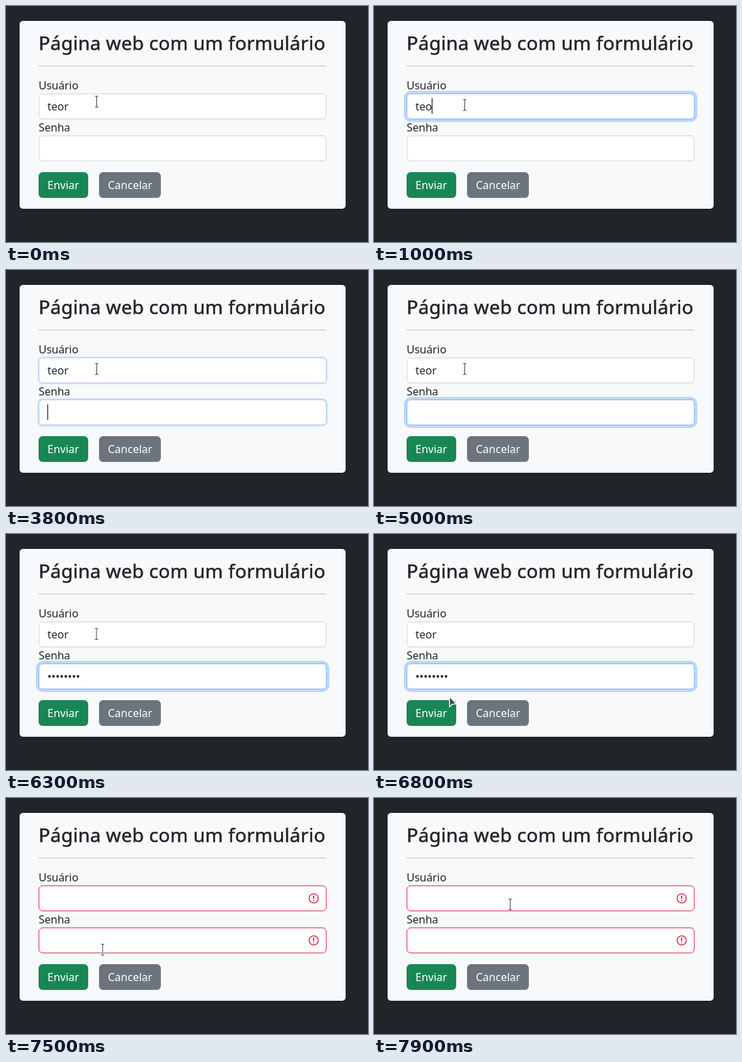
Write an HTML page that moves like this. It is 533 by 348 pixels and loops after 8 s.

```html
<!DOCTYPE html>
<html lang="pt">
<head>
<meta charset="utf-8">
<style>
  html, body { margin: 0; width: 100%; height: 100%; overflow: hidden; background: #212529; }
  svg { display: block; width: 533px; height: 348px; }
  text { font: 16px "Noto Sans", sans-serif; fill: #212529; }
  /* a thin outline and looser spacing give a medium weight */
  .title { font-size: 28px; letter-spacing: .01em; stroke: #212529; stroke-width: .5px; }
  .button { fill: #fff; }
  .ring { fill: none; stroke: #0d6efd; }
</style>
</head>
<body>
<svg viewBox="0 0 533 348">
  <defs><path id="bar" d="M-2.5-8H2.5M0-8V8M-2.5 8H2.5"/></defs>
  <rect x="20" y="22" width="480" height="277" rx="5" fill="#f8f9fa"/>
  <text class="title" x="48" y="65">Página web com um formulário</text>
  <rect x="48" y="88" width="424" height="1" fill="#c2c4c6"/>
  <g id="fields"></g>
  <text x="48" y="123">Usuário</text>
  <text x="48" y="185">Senha</text>
  <rect id="send" x="48" y="245" width="73" height="38" rx="6"/>
  <text class="button" x="61" y="270">Enviar</text>
  <rect x="137" y="245" width="91" height="38" rx="6" fill="#6c757d"/>
  <text class="button" x="150" y="270">Cancelar</text>
  <g id="pointer" stroke-linejoin="round">
    <g id="beam">
      <use href="#bar" stroke="#fff" stroke-width="2.4"/>
      <use href="#bar" stroke="#444"/>
    </g>
    <path id="hand" d="M-1.8 10V1.7a1.8 1.8 0 0 1 3.6 0V7l8.4 1.8q2.6.7 2.4 3.2l-1.4 8H1.5l-7.5-8q-.6-2.4 1.8-2.4z"
      fill="#444" stroke="#fff" stroke-width="1.4"/>
    <path id="arrow" d="M0 0V16l4-4 5.5-.3z" fill="#444" stroke="#fff" stroke-width="1.4"/>
  </g>
</svg>
<script>
const LOOP = 8000, STEP = 100, FADE = 150, RESET = 7100;
const $ = id => document.getElementById(id);

const fields = [
  { top: 129, text: "teor", focus: [345, 3720], carets: [[400, 1500], [2600, 3700]],
    count: t => 4 - presses(t, 1000, 150, 4) + presses(t, 2580, 240, 4) },
  { top: 191, text: "••••••••", focus: [3720, 7000], carets: [[3700, 5000], [5200, 6100]],
    count: t => presses(t, 5200, 105, 8) }
];

// each move eases the pointer to a new place
const home = [133.5, 141];
const moves = [
  { from: 0, to: 200, place: [133.5, 146] },
  { from: 6250, to: 7050, place: [104.5, 267] },
  { from: 7200, to: 7900, place: [200.5, 157] }
];

$("fields").innerHTML = fields.map(({ top }) => `<g transform="translate(48 ${top})">
  <rect class="ring"/>
  <rect class="box" x=".5" y=".5" width="423" height="37" rx="5.5" fill="#fff"/>
  <text x="13" y="25"></text>
  <rect class="caret" y="7" width="1" height="23"/>
  <g class="error" transform="translate(396 10) scale(1.5)" fill="#dc3545" stroke="#dc3545">
    <circle cx="6" cy="6" r="4.5" fill="none"/>
    <path d="M5.8 3.6h.4L6 6.5z" stroke-linejoin="round"/>
    <circle cx="6" cy="8.2" r=".6" stroke="none"/>
  </g></g>`).join("");

fields.forEach((field, i) => {
  const group = $("fields").children[i];
  for (const part of ["ring", "box", "caret", "error"]) field[part] = group.querySelector("." + part);
  field.label = group.querySelector("text");
});

const set = (el, attrs) => { for (const k in attrs) el.setAttribute(k, attrs[k]); };
const show = (el, on) => { el.style.display = on ? "" : "none"; };
const within = (v, a, b) => v >= a && v < b;
const clamp = (v, a, b) => Math.min(b, Math.max(a, v));
const mix = (a, b, p) => `color-mix(in srgb, ${b} ${p * 100}%, ${a})`;
const presses = (t, start, gap, max) => clamp(Math.floor((t - start) / gap) + 1, 0, max);

function ramp(t, from, to = from + FADE) {
  const p = clamp((t - from) / (to - from), 0, 1);
  return p * p * (3 - 2 * p);
}

function pointerAt(t) {
  return moves.reduce((pos, { from, to, place }) => {
    const p = ramp(t, from, to);
    return pos.map((v, i) => v + (place[i] - v) * p);
  }, home);
}

function drawField(f, t) {
  const focus = ramp(t, f.focus[0]) - ramp(t, f.focus[1]);
  const w = 4 * focus;
  set(f.ring, { x: -w / 2, y: -w / 2, width: 424 + w, height: 38 + w, rx: 6 + w / 2,
    "stroke-width": w, "stroke-opacity": 0.25 * focus });
  f.box.style.stroke = mix(mix("#ced4da", "#86b7fe", focus), "#dc3545", ramp(t, RESET + 50));
  show(f.error, t > RESET);
  const count = t < RESET ? f.count(t) : 0;
  f.label.textContent = f.text.slice(0, count);
  const width = count ? f.label.getComputedTextLength() : 0;
  set(f.caret, { x: 13 + Math.floor(width + 0.4) });
  show(f.caret, f.carets.some(([a, b]) => within(t, a, b)));
}

function draw(now) {
  const t = Math.floor(now % LOOP / STEP) * STEP;
  fields.forEach(f => drawField(f, t));
  const [x, y] = pointerAt(t);
  const onSend = within(x, 48, 121) && within(y, 245, 283);
  const onInput = fields.some(f => within(y, f.top, f.top + 38));
  set($("pointer"), { transform: `translate(${x} ${y})` });
  set($("send"), { fill: onSend ? "#157347" : "#198754" });
  show($("hand"), onSend);
  show($("beam"), onInput);
  show($("arrow"), !onSend && !onInput);
  requestAnimationFrame(draw);
}
requestAnimationFrame(draw);
</script>
</body>
</html>
```
